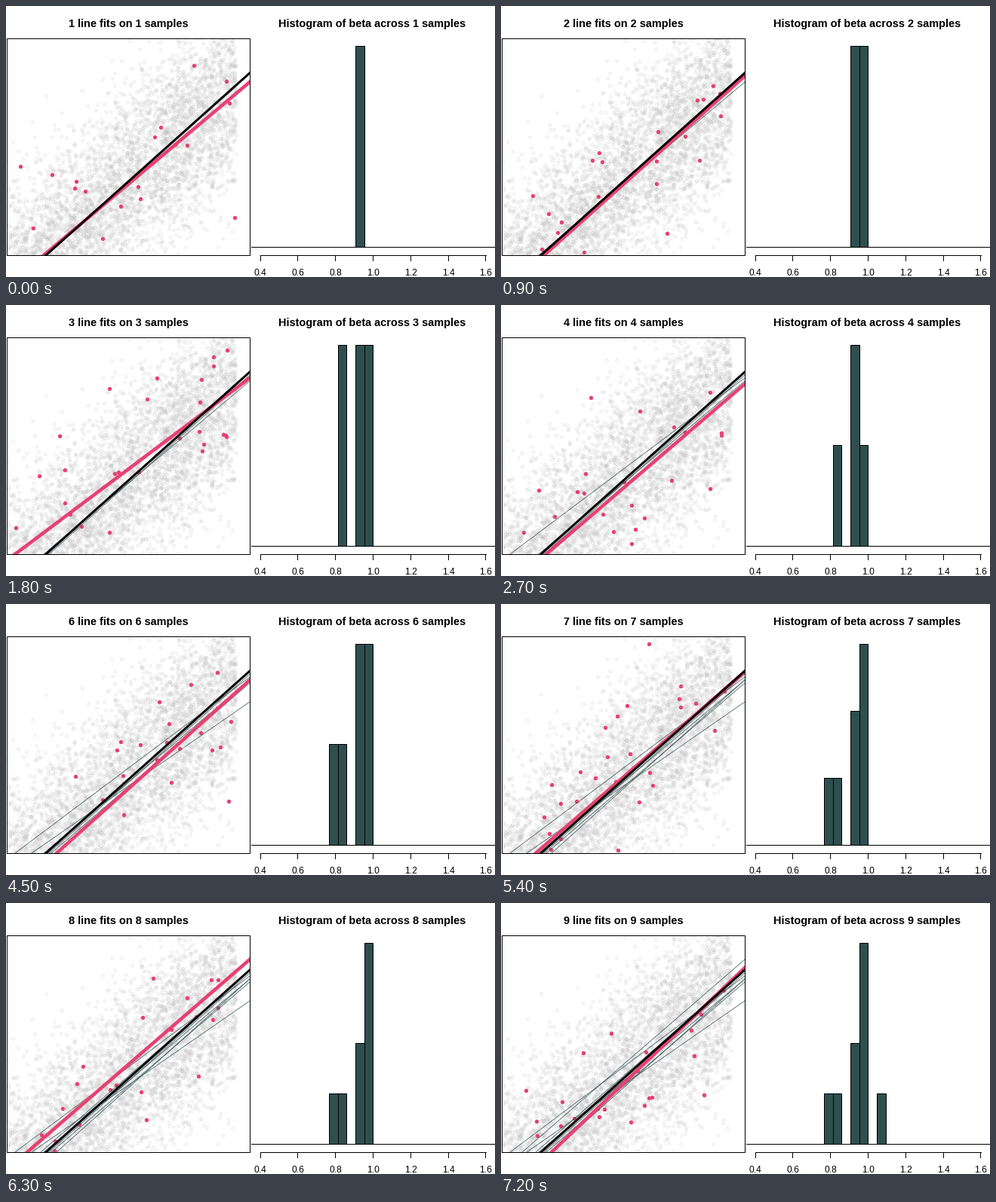
Recreate the animation shown at these times as a matplotlib script. Size 648 px wide and 360 px high, loop 8000 ms.

```python
import numpy as np
import matplotlib.pyplot as plt
from matplotlib.animation import FuncAnimation
from matplotlib.patches import Rectangle

W, H, DPI = 648, 360, 100
PX = 72 / DPI  # one pixel in points
LEFT, RIGHT, TOP, BOTTOM = 1, 323, 43, 331
BASE, BAR_TOP = 320, 53
BIN_START, BIN_WIDTH, BIN_COUNT = 428.1, 11.65, 7
BETA_PER_SLOPE = 1.108
PINK, SLATE, CLOUD = "#e64173", "#2f4f4f", (0.72, 0.72, 0.72, 0.12)
STEP_FRAMES, FRAMES, INTERVAL = 9, 80, 100

plt.rcParams["font.family"] = "Liberation Sans"
rng = np.random.default_rng(12)

# Fitted lines: x on the bottom edge of the panel, y on its right edge.
TRUE_FIT = (53, 89)
FITS = [(50, 101), (57, 93), (12, 97), (60, 105), (34, 130),
        (67, 101), (46, 90), (28, 75), (67, 86)]


def slope(fit):
    x0, y1 = fit
    return (BOTTOM - y1) / (RIGHT - x0)


def height_at(fit, x):
    return BOTTOM - slope(fit) * (x - fit[0])


def line_points(fit):
    x = np.array([LEFT - 20, RIGHT + 20])
    return x, height_at(fit, x)


def scatter_around(fit, n, spread):
    """Random points around a line, kept inside the panel."""
    x = rng.uniform(LEFT, 305, n)
    y = height_at(fit, x) + rng.normal(0, spread, n)
    keep = (y > TOP - 2) & (y < BOTTOM + 2)
    return x[keep], y[keep]


def beta_x(beta):
    """Horizontal place of a beta value on the histogram axis."""
    return 336.5 + 249 * (beta - 0.4)


def bin_of(fit):
    return int((beta_x(BETA_PER_SLOPE * slope(fit)) - BIN_START) // BIN_WIDTH)


cloud = scatter_around(TRUE_FIT, 5000, 64)
samples = [scatter_around(fit, 28, 58) for fit in FITS]
bins = [bin_of(fit) for fit in FITS]

fig = plt.figure(figsize=(W / DPI, H / DPI), dpi=DPI, facecolor="white")
ax = fig.add_axes([0, 0, 1, 1])
ax.set(xlim=(0, W), ylim=(H, 0))
ax.axis("off")

box = Rectangle((LEFT, TOP), RIGHT - LEFT, BOTTOM - TOP, fill=False,
                ec="black", lw=PX, zorder=9)
ax.add_patch(box)


def draw(x, y, **style):
    """Line or markers clipped to the scatter panel."""
    artist, = ax.plot(x, y, **style)
    artist.set_clip_path(box)
    return artist


def draw_fit(fit, color, width, zorder):
    return draw(*line_points(fit), color=color, lw=width * PX, zorder=zorder)


def rule(x, y):
    ax.plot(x, y, color="black", lw=PX, solid_capstyle="projecting")


def title(x):
    return ax.text(x, 28, "", fontsize=14.5 * PX, weight="bold",
                   ha="center", va="baseline")


# Scatter panel
draw(*cloud, ls="", marker="o", ms=4.4 * PX, mfc=CLOUD, mec=CLOUD, mew=PX,
     zorder=1)
dots = draw([], [], ls="", marker="o", ms=5.4 * PX, mfc=PINK, mew=0, zorder=2)
old_fits = [draw_fit(fit, SLATE, 0.7, 3) for fit in FITS]
new_fit = draw_fit(FITS[0], PINK, 4.6, 4)
draw_fit(TRUE_FIT, "black", 3, 5)
left_title = title(162)

# Histogram panel
edges = np.round(BIN_START + BIN_WIDTH * np.arange(BIN_COUNT + 1))
bars = [Rectangle((a, BASE), b - a, 0, fc=SLATE, ec="black", lw=PX, zorder=3)
        for a, b in zip(edges, edges[1:])]
for bar in bars:
    ax.add_patch(bar)
rule([325, W], [BASE, BASE])
rule([337, 636], [331, 331])
for beta in np.linspace(0.4, 1.6, 7):
    x = beta_x(beta)
    rule([x, x], [331, 338])
    ax.text(x + 0.5, 358, f"{beta:.1f}", fontsize=12 * PX,
            ha="center", va="baseline")
right_title = title(485.5)


def update(frame):
    k = min(frame // STEP_FRAMES, len(FITS) - 1)
    n = k + 1
    left_title.set_text(f"{n} line fits on {n} samples")
    right_title.set_text(f"Histogram of beta across {n} samples")
    dots.set_data(*samples[k])
    new_fit.set_data(*line_points(FITS[k]))
    for i, fit in enumerate(old_fits):
        fit.set_visible(i < k)
    counts = np.bincount(bins[:n], minlength=BIN_COUNT)
    heights = np.round((BASE - BAR_TOP) * counts / counts.max())
    for bar, h in zip(bars, heights):
        bar.set_height(-h)
        bar.set_visible(h > 0)
    return []


anim = FuncAnimation(fig, update, frames=FRAMES, interval=INTERVAL,
                     repeat=True, repeat_delay=0)
plt.show()
```
